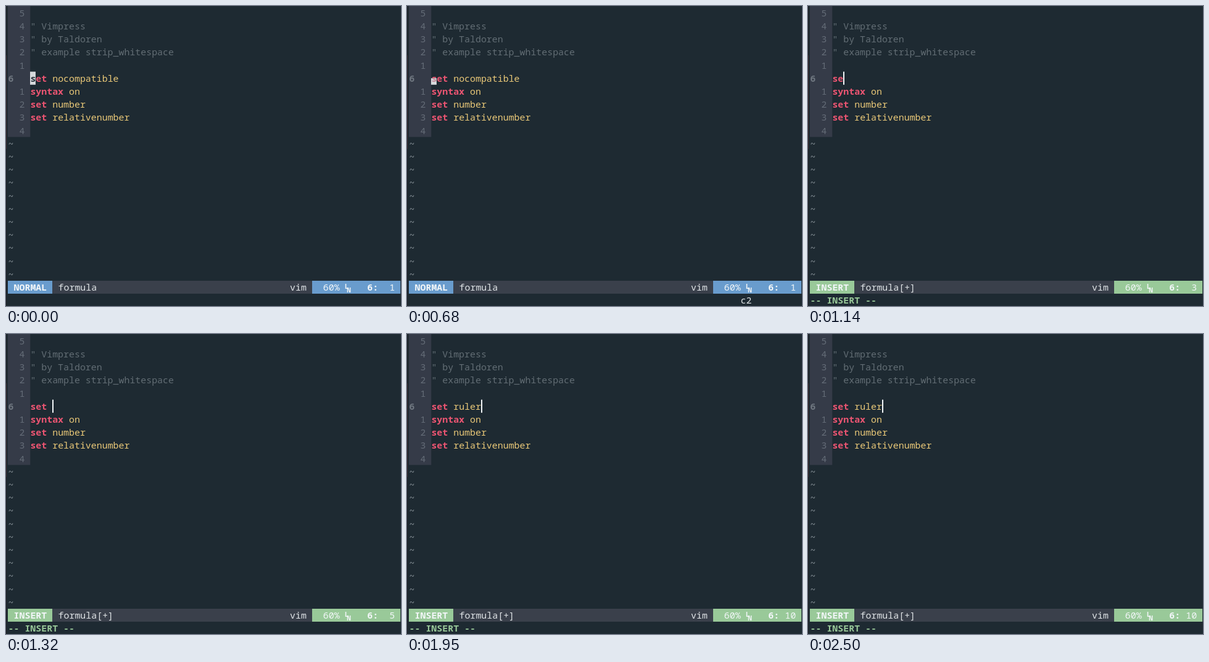
An HTML page with a canvas that plays this animation: 640x487 px, repeating every 2.55 s.

```html
<!DOCTYPE html>
<html lang="en">
<head>
<meta charset="utf-8">
<title>Vim editing</title>
<style>
  html, body { margin: 0; width: 100%; height: 100%; overflow: hidden; background: #1e2a32; }
  canvas { display: block; }
</style>
</head>
<body>
<canvas id="screen" width="640" height="487"></canvas>
<script>
const ctx = document.getElementById('screen').getContext('2d');
const LOOP = 2550, LEFT = 3.6, TOP = 0.6, COL = 8.95, ROW = 21.2, GUTTER = 4;
const C = {
  bg: '#1e2a32', gutter: '#353b48', comment: '#626d74', number: '#646c77', current: '#6f7780',
  tilde: '#89939a', red: '#ec5572', yellow: '#e9c878', text: '#e0e4e7', white: '#f2f6f8',
  blue: '#699ccd', green: '#99c999', bar: '#3a404b', cursor: '#d6d9dc'
};

// Normal-mode keys, then the times of the typed letters.
const KEY_C = 300, KEY_2 = 480, KEY_W = 820;
const TYPED = 'set ruler';
const TYPE_TIMES = [950, 1080, 1180, 1290, 1390, 1480, 1580, 1690, 1790];

const x = col => LEFT + col * COL;
const y = row => TOP + row * ROW;

function rect(left, top, right, bottom, color) {
  ctx.fillStyle = color;
  ctx.fillRect(left, top, right - left, bottom - top);
}

function write(text, col, row, color, bold, size = COL / 0.6) {
  ctx.font = `${bold ? 'bold ' : ''}${size}px "Noto Sans Mono", monospace`;
  ctx.fillStyle = color;
  ctx.fillText(text, x(col), y(row) + 16.2);
}

function command(line, row) {
  const [word] = line.split(' ');
  const option = line.slice(word.length + 1);
  const known = !['r', 'rul', 'rule'].includes(option);
  write(word, GUTTER, row, C.red, true);
  write(option, GUTTER + word.length + 1, row, known ? C.yellow : C.text);
}

function buffer(line) {
  rect(3, 0, 39.3, y(10), C.gutter);
  for (let row = 0; row < 10; row++) {
    if (row === 5) write('6', 0, row, C.current, true);
    else write(Math.abs(row - 5), 2, row, C.number);
  }
  ['" Vimpress', '" by Taldoren', '" example strip_whitespace']
    .forEach((text, i) => write(text, GUTTER, i + 1, C.comment));
  [line, 'syntax on', 'set number', 'set relativenumber']
    .forEach((text, i) => command(text, i + 5));
  for (let row = 10; row < 21; row++) write('~', 0, row, C.tilde);
}

function statusLine(insert, column) {
  const accent = insert ? C.green : C.blue;
  const top = Math.round(y(21)), bottom = Math.round(y(22));
  rect(3, top, 639, bottom, C.bar);
  rect(3, top, 75, bottom, accent);
  rect(496, top, 639, bottom, accent);
  write(insert ? 'INSERT' : 'NORMAL', 1, 21, C.white, true);
  write(insert ? 'formula[+]' : 'formula', 9.05, 21, C.text);
  write('vim', 51, 21, C.text);
  write('60%', 57, 21, C.white);
  write('L', 60.9, 20.88, C.white, true, 11);
  write('N', 61.3, 21.15, C.white, true, 11);
  write('6:', 65, 21, C.white, true);
  write(String(column).padStart(2), 68, 21, C.white);
}

function cursor(column, insert, pending) {
  const left = Math.round(x(GUTTER + column)), top = y(5);
  if (insert) {
    rect(left, top, left + 2, top + ROW, C.white);
    return;
  }
  const cut = pending ? top + ROW / 2 : top;
  rect(left, cut, left + COL, top + ROW, C.cursor);
  ctx.save();
  ctx.beginPath();
  ctx.rect(left, cut, COL, ROW);
  ctx.clip();
  write('s', GUTTER, 5, pending ? '#c08a98' : '#2b343d', true);
  ctx.restore();
}

function draw(now) {
  const t = now % LOOP;
  const insert = t >= KEY_W;
  const typed = TYPE_TIMES.filter(time => time <= t).length;
  const pending = insert || t < KEY_C ? '' : t < KEY_2 ? 'c' : 'c2';

  rect(0, 0, 640, 487, C.bg);
  rect(0, 0, 1, 487, '#1a1c22');
  rect(0, 80, 1, 232, '#38262b');
  buffer(insert ? TYPED.slice(0, typed) : 'set nocompatible');
  cursor(typed, insert, pending);
  statusLine(insert, typed + 1);
  if (insert) write('-- INSERT --', 0, 22, C.green, true);
  else write(pending, 60, 22, C.text);
  requestAnimationFrame(draw);
}
requestAnimationFrame(draw);
</script>
</body>
</html>
```
